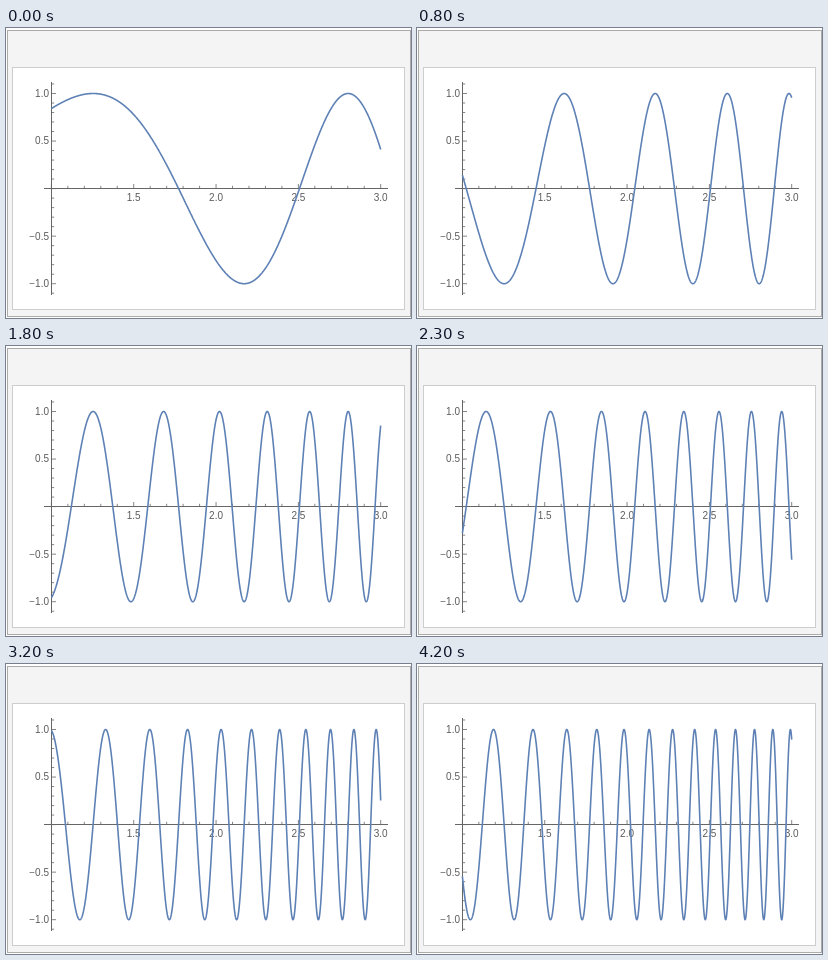
Write an HTML page that moves like this. It is 405x290 px and loops after 4500 ms.

```html
<!DOCTYPE html>
<html lang="en">
<head>
<meta charset="utf-8">
<title>sin(n x²)</title>
<style>
  html, body { margin: 0; width: 100%; height: 100%; overflow: hidden; background: #fff; }
  svg { display: block; width: 405px; height: 290px; }
  text { font: 10px "Liberation Sans", Arial, sans-serif; fill: #5c5c5c; }
</style>
</head>
<body>
<svg viewBox="0 0 405 290">
  <rect x="1.5" y="2.5" width="403" height="286" fill="#f4f4f4" stroke="#ababab"/>
  <rect x="6.5" y="39.5" width="392" height="242" fill="#fff" stroke="#cdcdcd"/>
  <path id="axes" fill="none" stroke="#666" stroke-width="1"/>
  <path id="ticks" fill="none" stroke="#666" stroke-width=".8"/>
  <g id="labels"></g>
  <path id="curve" fill="none" stroke="#5e81b5" stroke-width="1.6" stroke-linejoin="round"/>
</svg>
<script>
const LOOP = 4500;
const STEPS = [300, 800, 1300, 1800, 2300, 2700, 3200, 3700, 4200];
const SAMPLES = 1400;
const byId = id => document.getElementById(id);
const px = x => 45.4 + (x - 1) * 164.65;
const py = y => 160.6 - y * 95.1;

function addLabel(text, x, y, anchor) {
  const node = document.createElementNS("http://www.w3.org/2000/svg", "text");
  node.setAttribute("x", x);
  node.setAttribute("y", y);
  node.setAttribute("text-anchor", anchor);
  node.textContent = text;
  byId("labels").append(node);
}

function drawAxes() {
  byId("axes").setAttribute("d", "M38 160.5H382M45.5 54V267");
  let ticks = "";
  for (let i = -11; i <= 11; i++) {
    const major = i % 5 === 0;
    ticks += `M45.5 ${py(i / 10)}h${major ? 4.5 : 2.7}`;
    if (major && i) addLabel((i / 10).toFixed(1).replace("-", "−"), 43, py(i / 10) + 3.4, "end");
  }
  for (let i = 10; i <= 30; i++) {
    const major = i % 5 === 0;
    ticks += `M${px(i / 10)} 160.5v${major ? -4.5 : -2.7}`;
    if (major && i > 10) addLabel((i / 10).toFixed(1), px(i / 10), 173.4, "middle");
  }
  byId("ticks").setAttribute("d", ticks);
}

function drawCurve(n) {
  let d = "";
  for (let i = 0; i <= SAMPLES; i++) {
    const x = 1 + 2 * i / SAMPLES;
    d += `${i ? "L" : "M"}${px(x).toFixed(2)} ${py(Math.sin(n * x * x)).toFixed(2)}`;
  }
  byId("curve").setAttribute("d", d);
}

let shown = 0;
function render(time) {
  const t = time % LOOP;
  const n = 1 + STEPS.filter(step => t >= step).length;
  if (n !== shown) drawCurve(shown = n);
}

drawAxes();
render(0);
const start = performance.now();
function tick() {
  render(performance.now() - start);
  requestAnimationFrame(tick);
}
requestAnimationFrame(tick);
</script>
</body>
</html>
```
